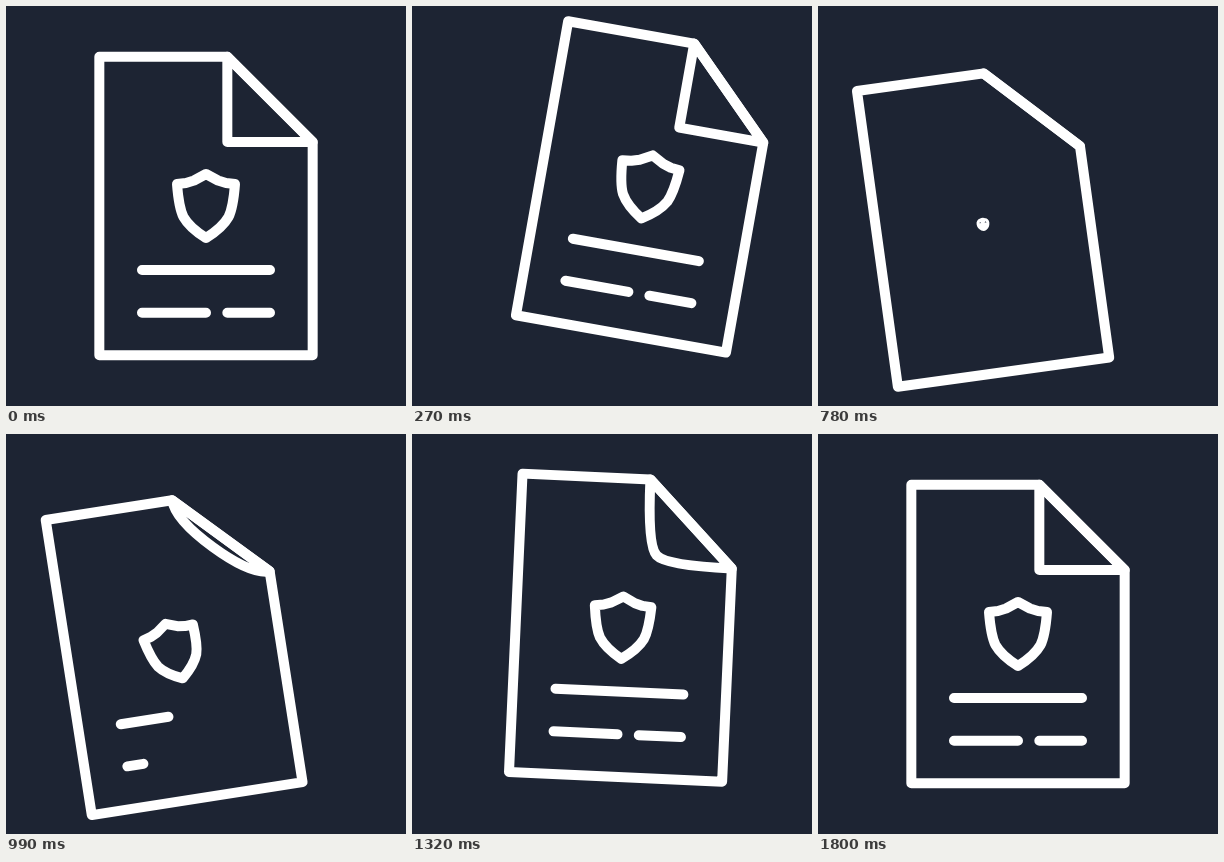
An HTML page for the animation above (3.83 s loop, 400 px wide and 400 px high).

```html
<!DOCTYPE html>
<html lang="en">
<head>
<meta charset="utf-8">
<title>Document with shield</title>
<style>
  html, body { margin: 0; width: 100%; height: 100%; overflow: hidden; background: #1d2433; }
  svg { display: block; width: 100%; height: 100%; }
  path { fill: none; stroke: #fff; stroke-width: 10; stroke-linecap: round; stroke-linejoin: round; }
  #fold { fill: #1d2433; }
</style>
</head>
<body>
<svg viewBox="0 0 400 400">
  <g id="page">
    <path id="rows"/>
    <path id="shield" d="M0-32L12-25.5L20-23L29-22C28-9 26 4 22.5 11C18 19 8 27 0 32C-8 27-18 19-22.5 11C-26 4-28-9-29-22L-20-23L-12-25.5Z"/>
    <path id="fold"/>
    <path id="outline"/>
  </g>
</svg>
<script>
const LOOP = 3830, STEP = 30, END = 1800;
const FLIPPED = 770; // the old sheet has turned over completely
const U = 64 / 3;    // grid unit, measured from the page centre

// Key tables: [time, value]
const SHIFT_X = [[0, 0], [340, 39], [860, -39.4], [1380, 12], [1770, 0]];
const SHIFT_Y = [[0, 0], [345, -21.5], [865, 21], [1380, -7.3], [1780, 0]];
const TILT = [[0, 0], [350, 11.5], [890, -10], [1440, 4.2], [1800, 0]];
const FLIP = [[390, 0], [FLIPPED, 1]];
const SHIELD_SIZE = [[730, 0], [1100, 1.12], [1440, 0.92], [1800, 1]];
const SHIELD_TURN = [[730, 0], [1100, -11], [1450, 4], [1800, 0]];
const ROW_1 = [[790, 0], [1265, 1]];
const ROW_2 = [[870, 0], [1340, 1]];
const CURL = [[890, 0], [1710, 1]];

const smooth = u => (1 - Math.cos(Math.PI * u)) / 2;
const easeOut = u => 1 - (1 - u) ** 2;
const $ = id => document.getElementById(id);
const pt = (x, y) => `${(x * U).toFixed(2)} ${(y * U).toFixed(2)}`;

function track(keys, t, ease = smooth) {
  if (t <= keys[0][0]) return keys[0][1];
  for (let i = 1; i < keys.length; i++) {
    const [t0, a] = keys[i - 1], [t1, b] = keys[i];
    if (t < t1) return a + (b - a) * ease((t - t0) / (t1 - t0));
  }
  return keys[keys.length - 1][1];
}

const dash = (x, y, length) => length > 0 ? `M${pt(x, y)}L${pt(x + length, y)}` : '';

function rowsPath(p, q) {
  const drawn = q * 5;
  return dash(-3, 3, p * 6) + dash(-3, 5, Math.min(drawn, 3)) + dash(1, 5, Math.min(drawn - 3, 2));
}

// The dog-ear grows until it covers the whole page.
function flipPath(p) {
  const x = 1 - 6 * p, y = -3 + 10 * p;
  return `M${pt(1, -7)}L${pt(x, -7)}L${pt(x, y)}L${pt(5, y)}L${pt(5, -3)}Z`;
}

// A new dog-ear bulges out of the cut corner and sharpens.
function curlPath(p) {
  const x = 3 - 2 * p, y = -5 + 2 * p, soft = 1.48 * (1 - p), pull = 2.3 * p;
  return `M${pt(1, -7)}C${pt(1, -7 + pull)} ${pt(x - soft, y - soft)} ${pt(x, y)}` +
    `C${pt(x + soft, y + soft)} ${pt(5 - pull, -3)} ${pt(5, -3)}Z`;
}

function draw(t) {
  const renewed = t >= FLIPPED && t < END;
  $('page').setAttribute('transform',
    `translate(${200 + track(SHIFT_X, t)} ${200 + track(SHIFT_Y, t)}) rotate(${track(TILT, t)})`);

  const size = renewed ? track(SHIELD_SIZE, t) : 1;
  const turn = renewed ? track(SHIELD_TURN, t) : 0;
  $('shield').setAttribute('transform', `rotate(${turn}) scale(${size})`);
  $('shield').style.strokeWidth = 10 / size;

  $('rows').setAttribute('d', renewed ? rowsPath(track(ROW_1, t), track(ROW_2, t)) : rowsPath(1, 1));
  $('fold').setAttribute('d', renewed ? curlPath(track(CURL, t, easeOut)) : flipPath(t < END ? track(FLIP, t) : 0));
}

$('outline').setAttribute('d',
  `M${pt(-5, -7)}L${pt(1, -7)}L${pt(5, -3)}L${pt(5, 7)}L${pt(-5, 7)}Z`);

const start = performance.now();
function tick() {
  const t = (performance.now() - start) % LOOP;
  draw(Math.min(END, Math.floor(t / STEP) * STEP));
  requestAnimationFrame(tick);
}
tick();
</script>
</body>
</html>
```
